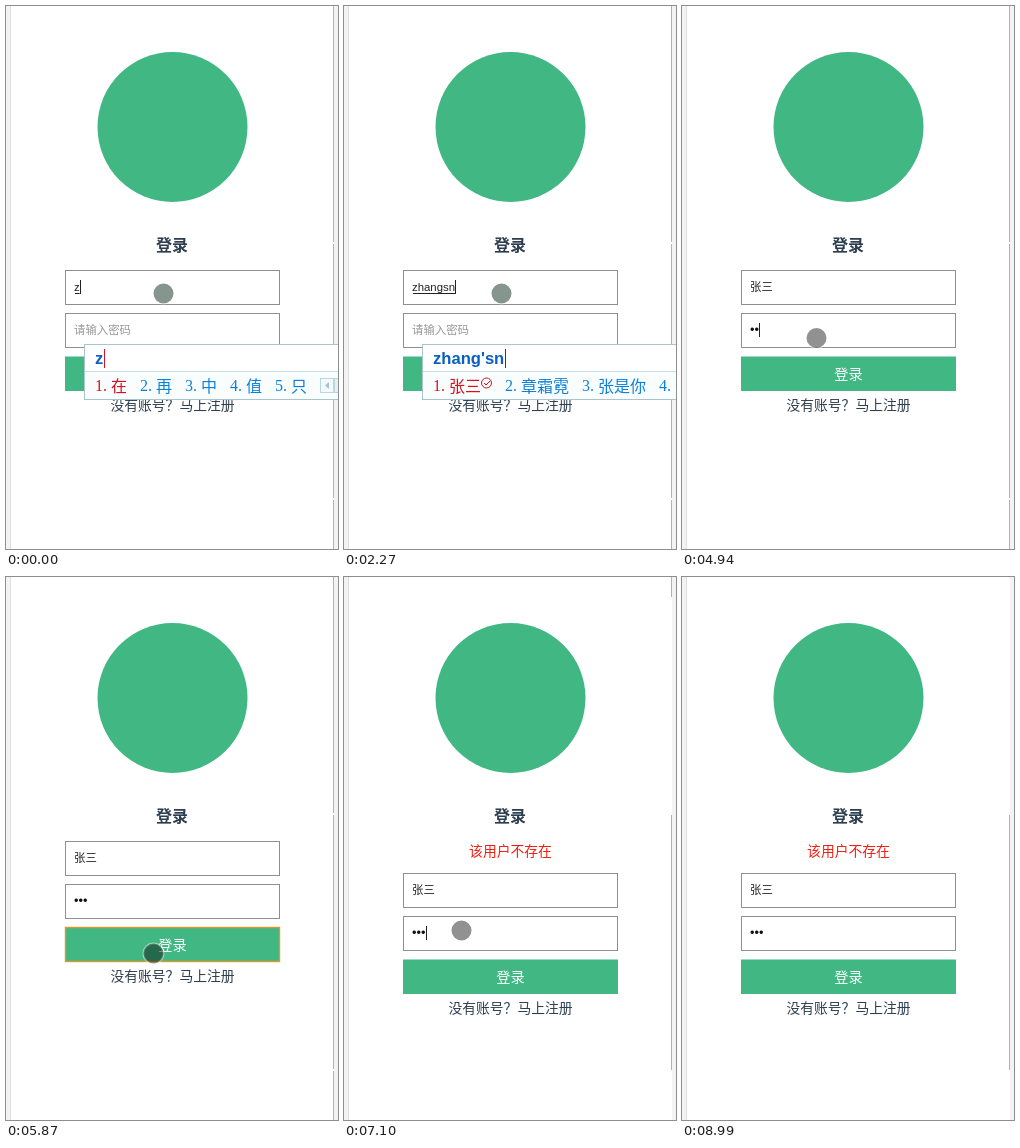
An HTML page for the animation above (9.06 s loop, 332x543 px).

```html
<!DOCTYPE html>
<html lang="zh-CN">
<head>
<meta charset="utf-8">
<title>登录</title>
<style>
  html, body { margin: 0; width: 100%; height: 100%; overflow: hidden; background: #f3f3f3; }
  svg { display: block; width: 100%; height: 100%; }
  text { font-family: "Noto Sans CJK SC", "Noto Sans CJK", sans-serif; white-space: pre; }
  .center { text-anchor: middle; }
  .body { font-size: 13.8px; fill: #2c3e50; }
  .centered-mark { font-family: "Noto Sans CJK TC", "Noto Sans CJK", sans-serif; }
  .input { font: 11.4px "Liberation Sans", "Noto Sans CJK SC", "Noto Sans CJK", sans-serif; fill: #222; }
  .hint { fill: #999; }
  .mask { font-size: 12.8px; fill: #111; }
  .field { fill: #fff; stroke: #8f8f8f; }
  .pinyin { font: bold 16.6px "Liberation Sans", sans-serif; fill: #0a5fc0; }
  .index { font: 16px "Liberation Serif", serif; }
  .word { font-size: 16px; }
</style>
</head>
<body>
<svg viewBox="0 0 332 543">
  <rect width="332" height="543" fill="#f3f3f3"/>
  <rect x="4" y="-2" width="324" height="547" fill="#fff"/>
  <path d="M4.5 0V543" stroke="#dedede"/>
  <path id="edge" stroke="#b2b2b2"/>
  <circle cx="166.5" cy="121" r="75" fill="#41b883"/>
  <text class="center" x="166" y="245" font-size="16" font-weight="bold" fill="#2c3e50">登录</text>
  <text id="error" class="body center" x="166.5" y="279" style="fill:#f21c0d">该用户不存在</text>
  <g id="form">
    <rect class="field" x="59.5" y="264.5" width="214" height="34"/>
    <rect class="field" x="59.5" y="307.5" width="214" height="34"/>
    <text id="name" class="input" x="68" y="285"></text>
    <path id="underline" stroke="#222"/>
    <text id="hint" class="input hint" x="68" y="328">请输入密码</text>
    <text id="mask" class="input mask" x="68" y="328"></text>
    <rect id="caret" width="1" height="14" fill="#222"/>
    <rect x="59" y="350.5" width="215" height="34.5" fill="#41b883"/>
    <rect id="focus" x="59.5" y="350.5" width="214" height="34" fill="none" stroke="#d99a2b" stroke-width="1.4"/>
    <text class="center" x="166.5" y="373" font-size="14.2" fill="#fff">登录</text>
    <text class="body center" x="166.5" y="403.5">没有账号<tspan class="centered-mark">？</tspan>马上注册</text>
  </g>
  <circle id="pointer" r="10" stroke="#fff" stroke-opacity=".45" stroke-width="2" paint-order="stroke"/>
  <g id="ime">
    <rect x="78.5" y="338.5" width="260" height="55" fill="#fff" stroke="#a9c3cf"/>
    <rect x="79" y="366" width="260" height="27" fill="#fafdfe"/>
    <path d="M79 365.5H332" stroke="#c9dbe3"/>
    <text id="pinyin" class="pinyin" x="89" y="358"></text>
    <rect id="imeCaret" y="343" width="1" height="19"/>
    <g id="words"></g>
    <g id="pager" fill="#f4f9fc" stroke="#bcd5e2">
      <rect x="314.5" y="372.5" width="13" height="14"/>
      <rect x="328.5" y="372.5" width="13" height="14" fill="#e2f0f8"/>
      <path d="M323 376V383L319 379.5Z" fill="#a5c3d3" stroke="none"/>
    </g>
  </g>
</svg>
<script>
const LOOP = 9060;
const ui = {};
document.querySelectorAll('[id]').forEach(el => ui[el.id] = el);

// time, typed text, composed pinyin, candidates ("*" adds a badge)
const typing = [
  [0, 'z', 'z', '在 再 中 值 只'],
  [170, 'zh', 'zh', '这 中 只 站 找'],
  [320, 'zha', 'zha', '炸 扎 咋 渣 诈骗'],
  [470, 'zhan', 'zhan', '站 占 战 展 沾'],
  [790, 'zhans', "zhan's", '展示 暂时 战士 战胜'],
  [1250, 'zhan', 'zhan', '站 占 战 展 沾'],
  [1710, 'zhang', 'zhang', '张 章 涨 掌 长'],
  [1860, 'zhangs', "zhang's", '张三 掌声 长沙 丈是'],
  [2170, 'zhangsn', "zhang'sn", '张三 章霜霓 张是你 长'],
  [2270, 'zhangsn', "zhang'sn", '张三* 章霜霓 张是你 长'],
  [2720, '张三', '', '']
];
// time, focused field (0 = no caret shown)
const carets = [[0, 1], [3260, 0], [3720, 1], [4090, 2], [4550, 0], [4720, 2], [5690, 0],
  [7100, 2], [7650, 0], [8190, 2], [8660, 0]];
const dots = [[0, 0], [4720, 1], [4940, 2], [5170, 3]];
// start, steps, step length, end point
const moves = [
  [3560, 5, 75, 134.5, 332],
  [5320, 6, 74, 147.5, 376.5],
  [6640, 3, 70, 117.5, 353.5],
  [7880, 8, 78.5, 270, 556]
];

const current = (table, t) => table.filter(row => row[0] <= t).pop();
const show = (el, on) => el.setAttribute('visibility', on ? 'visible' : 'hidden');
const set = (el, attrs) => { for (const k in attrs) el.setAttribute(k, attrs[k]); };

function draw(tag, attrs, text = '') {
  const el = document.createElementNS('http://www.w3.org/2000/svg', tag);
  set(el, attrs);
  el.textContent = text;
  ui.words.append(el);
}

function drawCandidates(list) {
  ui.words.replaceChildren();
  let x = 89;
  list.split(' ').filter(Boolean).forEach((item, i) => {
    const word = item.replace('*', '');
    const fill = i ? '#0b80d8' : '#d80f1c';
    draw('text', { class: 'index', x, y: 385, fill }, i + 1 + '.');
    draw('text', { class: 'word', x: x + 16, y: 386, fill }, word);
    x += 16 + word.length * 16;
    if (item !== word) {
      draw('circle', { cx: x + 5.5, cy: 377, r: 5, fill: 'none', stroke: fill });
      draw('path', { d: `M${x + 3} 377l2 2 4-4`, fill: 'none', stroke: fill });
      x += 11;
    }
    x += 13;
  });
}

let shown;
function drawTyping(row) {
  if (row === shown) return;
  shown = row;
  const [, typed, pinyin, list] = row;
  ui.name.textContent = typed;
  ui.pinyin.textContent = pinyin;
  const end = 68 + ui.name.getComputedTextLength();
  set(ui.underline, { d: pinyin ? `M69 287.5H${end}` : '' });
  set(ui.imeCaret, {
    x: Math.round(89 + ui.pinyin.getComputedTextLength() + .3),
    fill: pinyin.includes("'") ? '#24406e' : '#d8102a'
  });
  drawCandidates(list);
  show(ui.ime, pinyin);
  show(ui.pager, pinyin && list.length === 9);
}

function pointerAt(t) {
  let x = 157.5, y = 287.5;
  for (const [start, steps, length, endX, endY] of moves) {
    if (t < start) break;
    const p = Math.min(1, (Math.floor((t - start) / length) + 1) / steps);
    const k = p * p * (3 - 2 * p);
    x += (endX - x) * k;
    y += (endY - y) * k;
  }
  return [x, y];
}

function render(t) {
  drawTyping(current(typing, t));

  const count = current(dots, t)[1];
  ui.mask.textContent = '•'.repeat(count);
  show(ui.hint, !count);

  const field = current(carets, t)[1];
  show(ui.caret, field);
  const end = field === 2 ? count * 4.5 : ui.name.getComputedTextLength();
  set(ui.caret, { x: Math.round(68 + end), y: field === 2 ? 317 : 274 });

  const failed = t >= 5960;
  show(ui.error, failed);
  show(ui.focus, t >= 5870 && t < 7100);
  set(ui.form, { transform: `translate(0 ${failed ? 32 : 0})` });
  set(ui.edge, {
    d: !failed ? 'M327.5 0V236M327.5 238V492M327.5 494V543'
      : (t < 8990 ? 'M327.5 0V20' : '') + 'M327.5 238V493'
  });

  const [cx, cy] = pointerAt(t);
  set(ui.pointer, { cx, cy, fill: t < 3560 ? '#87958f' : 'rgba(0,0,0,.43)' });
}

const begin = performance.now();
function tick() {
  render((performance.now() - begin) % LOOP);
  requestAnimationFrame(tick);
}
tick();
</script>
</body>
</html>
```
